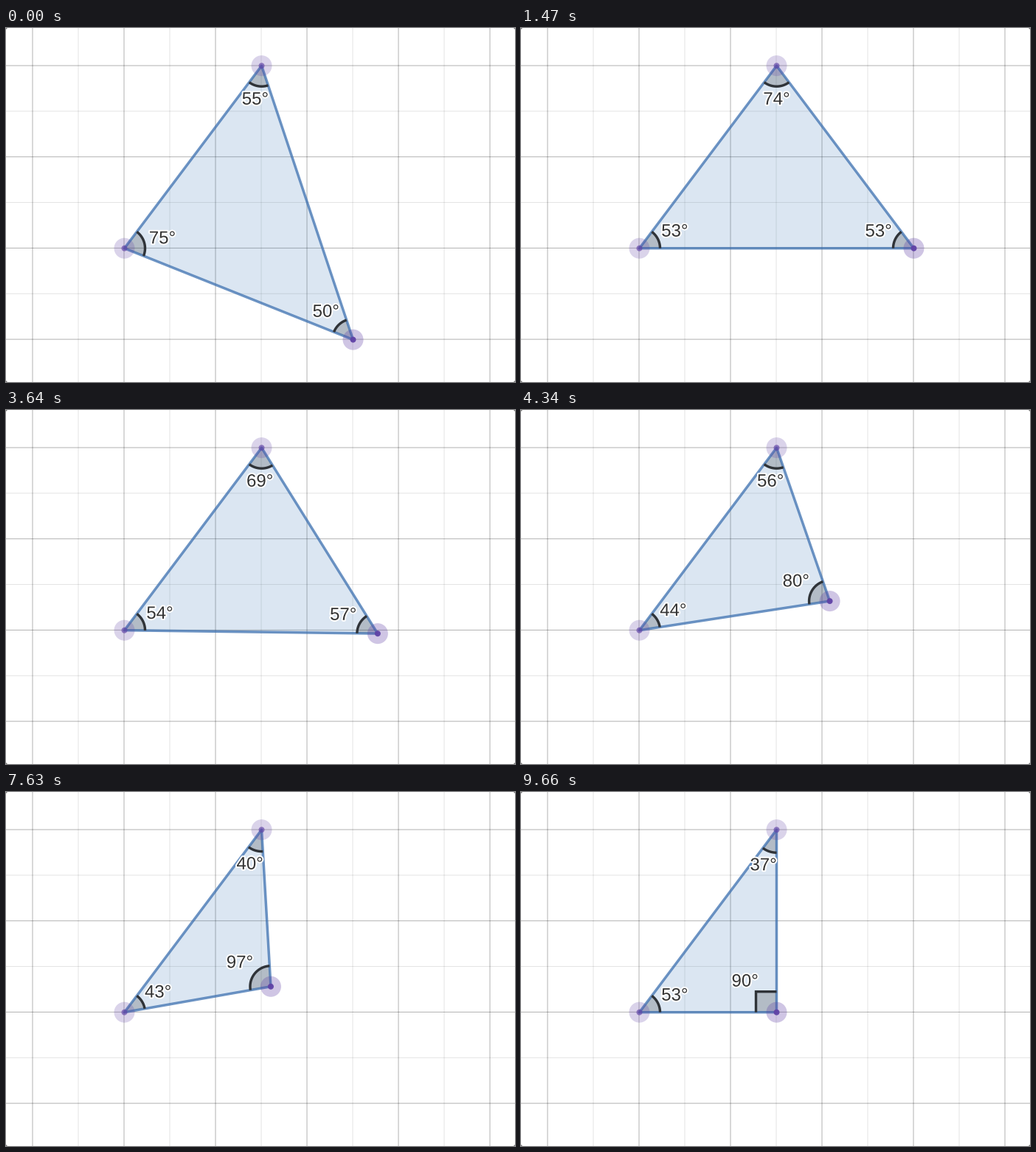
A matplotlib script that plays this animation: 690 by 480 pixels, repeating every 9730 ms.

```python
import numpy as np
import matplotlib.pyplot as plt
from matplotlib.animation import FuncAnimation
from matplotlib.patches import Circle, Polygon
from matplotlib.patheffects import withStroke

W, H, DPI = 690, 480, 100
FRAMES, INTERVAL = 139, 70
PX = 72 / DPI  # points per pixel

BLUE, PURPLE, INK = "#2d70b3", "#6042a6", "#2f3338"
EDGE = "#3c70b0"
TOP = np.array([346.5, 51.2])
LEFT = np.array([160.5, 298.7])


def smooth(s):
    return s * s * (3 - 2 * s)


def ease_out(s):
    return 1 - (1 - s) ** 1.5


# Each drag: frame before it starts, last frame, easing, Bezier start, control, end
DRAGS = [
    (10, 19, smooth, (470.5, 422.6), (499.8, 369), (526, 306)),
    (20, 21, smooth, (526, 306), (529, 302), (532.5, 298.7)),
    (40, 44, smooth, (532.5, 298.7), (528, 301), (524, 303)),
    (48, 67, smooth, (524, 303), (432, 308), (408.5, 237)),
    (104, 116, ease_out, (408.5, 237), (346.8, 252.8), (346.5, 298.7)),
]


def dragged(frame):
    """Position of the moving vertex."""
    pos = np.array(DRAGS[0][3])
    for start, end, ease, p0, p1, p2 in DRAGS:
        if frame <= start:
            break
        u = ease(min(1, (frame - start) / (end - start)))
        pos = ((1 - u) ** 2 * np.array(p0) + 2 * u * (1 - u) * np.array(p1)
               + u * u * np.array(p2))
    return pos


def unit(v):
    return v / np.hypot(*v)


fig = plt.figure(figsize=(W / DPI, H / DPI), dpi=DPI, facecolor="white")
ax = fig.add_axes([0, 0, 1, 1])
ax.set_xlim(0, W)
ax.set_ylim(H, 0)
ax.axis("off")


def draw_grid():
    for k in range(11):
        shade = 0.3 if k % 2 == 0 else 0.11
        style = dict(color="black", alpha=shade, lw=PX, zorder=1, snap=False)
        ax.axvline(36 + 62 * k, **style)
        if k < 7:
            ax.axhline(51 + 61.85 * k, **style)


def draw_corners():
    for x, dx in ((0, 2), (W, -2)):
        for y, dy in ((0, 2), (H, -2)):
            ax.add_patch(Polygon([(x, y), (x + dx, y), (x, y + dy)],
                                 fc="#777777", lw=0))


def make_point(pos, dot_alpha, halo_alpha):
    halo = Circle(pos, 14, fc=PURPLE, alpha=halo_alpha, lw=0, zorder=6)
    dot = Circle(pos, 4, fc=PURPLE, alpha=dot_alpha, lw=0, zorder=7)
    ax.add_patch(halo)
    ax.add_patch(dot)
    return halo, dot


class AngleMark:
    """Shaded sector, arc and degree label at one vertex."""

    def __init__(self):
        self.sector = Polygon([(0, 0)] * 3, fc="black", alpha=0.18, lw=0,
                              zorder=3, snap=False)
        ax.add_patch(self.sector)
        self.arc, = ax.plot([], [], color=INK, lw=3.4 * PX, zorder=5,
                            snap=False, solid_capstyle="butt",
                            solid_joinstyle="miter")
        self.label = ax.text(
            0, 0, "", family="Liberation Sans", fontsize=24 * PX,
            color="#333333", ha="center", va="baseline", zorder=8,
            path_effects=[withStroke(linewidth=4 * PX, foreground="white")])

    def update(self, vertex, p, q):
        a, b = unit(p - vertex), unit(q - vertex)
        angle = np.degrees(np.arccos(np.clip(a @ b, -1, 1)))
        mid = unit(a + b)
        r = 28 + 0.5 * max(0, 43 - angle)
        if abs(angle - 90) < 0.05:
            rim = vertex + r * np.array([a, a + b, b])
            reach = r + 7
        else:
            half = np.radians(angle / 2)
            t = np.arctan2(mid[1], mid[0]) + np.linspace(-half, half, 40)
            rim = vertex + r * np.column_stack([np.cos(t), np.sin(t)])
            reach = r
        self.sector.set_xy(np.vstack([vertex, rim]))
        self.arc.set_data(rim[:, 0], rim[:, 1])

        # wide labels need more room sideways than up and down
        room = 16.5 + 9.5 * min(1, (mid[0] / 0.7) ** 2)
        x, y = vertex + mid * (reach + np.array([25.5, room]))
        self.label.set_position((x, y + 8.1))
        self.label.set_text(f"{angle:.0f}°")


draw_grid()
draw_corners()
fill = Polygon([TOP, LEFT, TOP], fc=BLUE, alpha=0.17, lw=0, zorder=2)
outline = Polygon([TOP, LEFT, TOP], fill=False, ec=EDGE, alpha=0.75,
                  lw=3.5 * PX, joinstyle="round", snap=False, zorder=4)
ax.add_patch(fill)
ax.add_patch(outline)
make_point(TOP, 0.65, 0.23)
make_point(LEFT, 0.65, 0.23)
handle = make_point(TOP, 0.95, 0.3)
marks = [AngleMark() for _ in range(3)]


def update(frame):
    corners = [TOP, LEFT, dragged(frame)]
    fill.set_xy(corners)
    outline.set_xy(corners)
    for part in handle:
        part.center = tuple(corners[2])
    for i, mark in enumerate(marks):
        mark.update(corners[i], corners[i - 1], corners[i - 2])
    return []


anim = FuncAnimation(fig, update, frames=FRAMES, interval=INTERVAL,
                     repeat=True, repeat_delay=0, blit=False)
plt.show()
```
